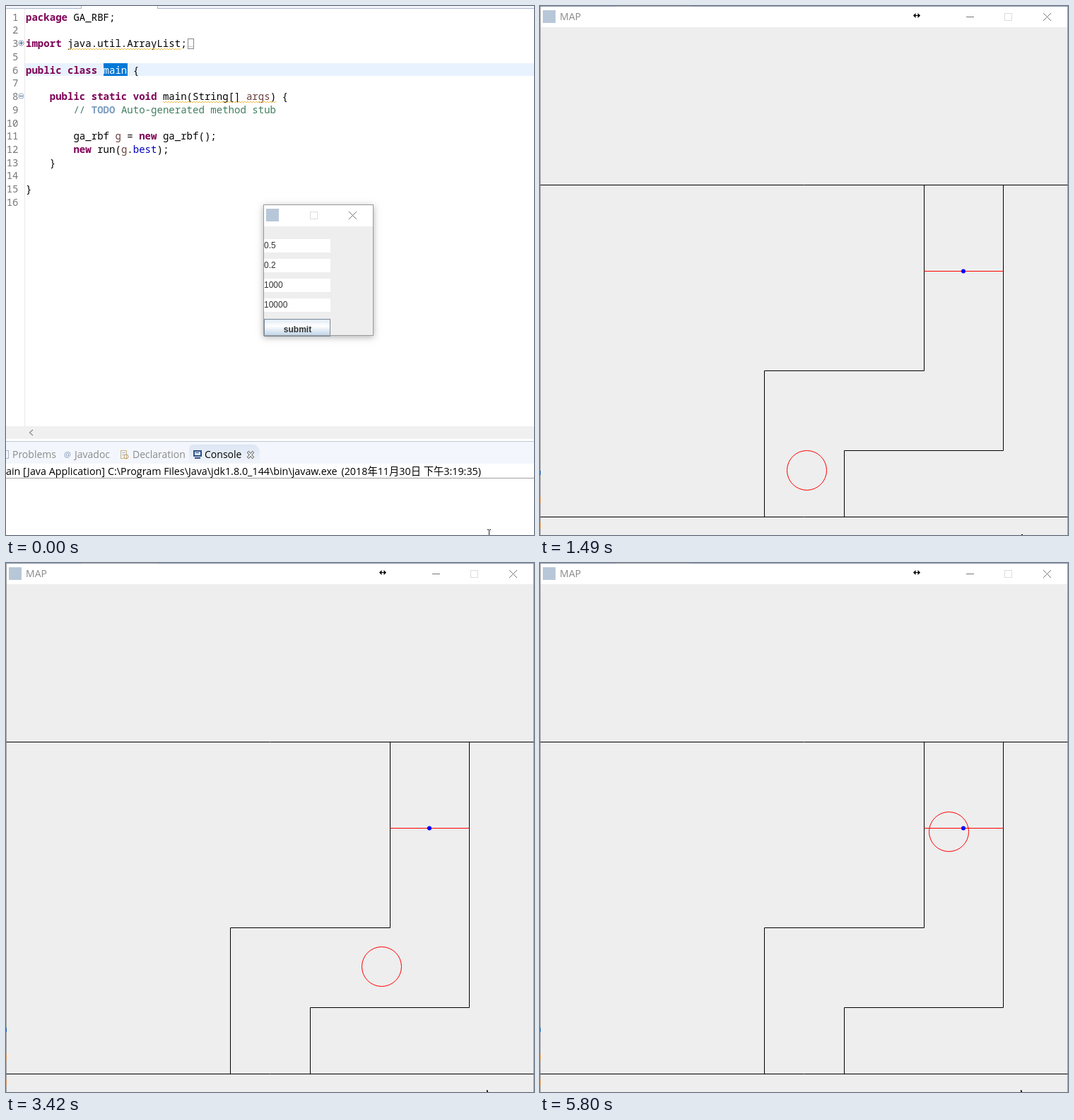
These frames come from a looping animation (747x749 px, 6.97 s). An HTML page with a canvas:

```html
<!DOCTYPE html>
<html lang="en">
<head>
<meta charset="utf-8">
<title>Map run</title>
<style>
  html, body { margin: 0; width: 100%; height: 100%; overflow: hidden; background: #fff; }
  canvas { position: absolute; left: 0; top: 0; display: block; }
</style>
</head>
<body>
<canvas id="desk" width="747" height="749"></canvas>
<canvas id="map" width="747" height="749"></canvas>
<script>
const W = 747, H = 749, LOOP = 6970;
const mapEl = document.getElementById('map');
const desk = document.getElementById('desk').getContext('2d');
const map = mapEl.getContext('2d');

const MONO = '14.05px "Noto Sans Mono", "Noto Sans CJK TC", "Noto Sans CJK", monospace';
const UI = '"Open Sans", "Noto Sans CJK TC", "Noto Sans CJK", sans-serif';
const ARIAL = '"Liberation Sans", Arial, sans-serif';
const CHAR = 8.43;
const ICON = '#b8c7d8';

// Bursts of screen updates: first time, last time, count
const BURSTS = [
  [800, 1320, 8], [1490, 1650, 3], [1790, 1950, 3], [2100, 2330, 4], [2500, 2650, 3],
  [2800, 3030, 4], [3190, 3420, 4], [3570, 3730, 3], [3880, 4110, 4], [4260, 4420, 3],
  [4570, 4730, 3], [4880, 5110, 4], [5260, 5420, 3], [5570, 5800, 4]
];
const TICKS = BURSTS.flatMap(([a, b, n]) =>
  Array.from({ length: n }, (_, i) => Math.floor((a + (b - a) * i / (n - 1)) / 10) * 10));

// Car path: move count, x, y
const PATH = [
  [0, 374.5, 722.5], [2, 374.5, 704.5], [6, 376.5, 667.5], [7, 377.5, 657.5], [9, 384.5, 641.5],
  [12, 401.5, 621.5], [16, 434.5, 602.5], [19, 459.5, 591.5], [21, 478.5, 587.5],
  [23, 496.5, 583.5], [27, 531.5, 571.5], [30, 555.5, 556.5], [33, 574.5, 537.5],
  [34, 580.5, 529.5], [37, 592.5, 504.5], [40, 599.5, 477.5], [42, 602.5, 459.5],
  [44, 601.5, 440.5], [47, 595.5, 413.5], [51, 578.5, 380.5]
];

function slope(i, c) {
  const a = PATH[Math.max(0, i - 1)], b = PATH[Math.min(PATH.length - 1, i + 1)];
  return (b[c] - a[c]) / (b[0] - a[0]);
}

// Smooth curve through the path, snapped to whole pixels
function carAt(k) {
  let i = 0;
  while (i < PATH.length - 2 && PATH[i + 1][0] <= k) i++;
  const p = PATH[i], q = PATH[i + 1], d = q[0] - p[0], u = (k - p[0]) / d, v = 1 - u;
  return [1, 2].map(c => {
    const at = v * v * (1 + 2 * u) * p[c] + u * u * (3 - 2 * u) * q[c]
      + d * u * v * (v * slope(i, c) - u * slope(i + 1, c));
    return Math.floor(at) + 0.5;
  });
}

function rect(g, x, y, w, h, color) {
  g.fillStyle = color;
  g.fillRect(x, y, w, h);
}

function frame(g, x, y, w, h, color) {
  g.strokeStyle = color;
  g.lineWidth = 1;
  g.strokeRect(x + 0.5, y + 0.5, w - 1, h - 1);
}

function poly(g, pts, color, width = 1) {
  g.strokeStyle = color;
  g.lineWidth = width;
  g.beginPath();
  pts.forEach(([x, y]) => g.lineTo(x, y));
  g.stroke();
}

function ring(g, x, y, r, color) {
  g.strokeStyle = color;
  g.lineWidth = 1;
  g.beginPath();
  g.arc(x, y, r, 0, Math.PI * 2);
  g.stroke();
}

function text(g, s, x, y, font, color, align = 'left') {
  g.font = font;
  g.fillStyle = color;
  g.textAlign = align;
  g.fillText(s, x, y);
}

function cross(g, x, y, r, color) {
  poly(g, [[x - r, y - r], [x + r, y + r]], color);
  poly(g, [[x - r, y + r], [x + r, y - r]], color);
}

function wave(x0, x1, y) {
  const pts = [];
  for (let x = x0, i = 0; x <= x1; x += 2, i++) pts.push([x, y + (i % 2 ? 1 : -1)]);
  poly(desk, pts, '#eebd4a');
}

const rowY = i => Math.round(20.7 + 18.73 * i);
const colX = c => 28 + CHAR * c;

// Styles: k keyword, p plain, v variable, f field, c comment, t task tag
const INK = { k: '#7f0055', p: '#000', v: '#6a3e3e', f: '#0000c0', c: '#3f7f5f', t: '#7f9fbf' };
const CODE = [
  [0, 0, 'k', 'package', 'p', ' GA_RBF;'],
  [2, 0, 'k', 'import', 'p', ' java.util.ArrayList;'],
  [4, 0, 'k', 'public class', 'p', '      {'],
  [6, 4, 'k', 'public static void', 'p', ' main(String[] ', 'v', 'args', 'p', ') {'],
  [7, 8, 'c', '// ', 't', 'TODO', 'c', ' Auto-generated method stub'],
  [9, 8, 'p', 'ga_rbf ', 'v', 'g', 'p', ' = ', 'k', 'new', 'p', ' ga_rbf();'],
  [10, 8, 'k', 'new', 'p', ' run(', 'v', 'g', 'p', '.', 'f', 'best', 'p', ');'],
  [11, 4, 'p', '}'],
  [13, 0, 'p', '}']
];

function drawEditor() {
  const g = desk;
  rect(g, 0, 0, W, 3, '#f3f5fa');
  rect(g, 107, 0, 107, 4, '#fff');
  rect(g, 0, 3, 106, 1, '#a9b8cf');
  rect(g, 214, 3, W - 214, 1, '#a9b8cf');
  rect(g, 106, 0, 1, 4, '#a9b8cf');
  rect(g, 214, 0, 1, 4, '#a9b8cf');
  rect(g, 26, 4, 1, 591, '#e8e8e8');

  rect(g, 27, 81, W - 27, 18, '#e8f2fe');
  for (let i = 0; i < 15; i++) {
    text(g, i < 3 ? i + 1 : i + 2, 17.5, rowY(i), MONO, '#787878', 'right');
  }
  for (const [row, indent, ...runs] of CODE) {
    let c = indent;
    for (let i = 0; i < runs.length; i += 2) {
      const style = runs[i], s = runs[i + 1];
      text(g, s, colX(c), rowY(row), (/[kt]/.test(style) ? 'bold ' : '') + MONO, INK[style]);
      c += s.length;
    }
  }
  rect(g, 138, 81, 34, 18, '#0078d7');
  text(g, 'main', colX(13), rowY(4), MONO, '#fff');
  wave(88, 249, 61);
  wave(222, 383, 136);

  frame(g, 257, 46, 9, 15, '#888');
  for (let i = 0; i < 3; i++) rect(g, 259 + 2 * i, 57, 1, 1, '#888');
  for (const [y, plus] of [[53, true], [128, false]]) {
    ring(g, 21.5, y - 0.5, 3.6, '#8fa3bd');
    rect(g, 19, y - 1, 5, 1, '#34608f');
    if (plus) rect(g, 21, y - 3, 1, 5, '#34608f');
  }

  rect(g, 0, 595, W, 18, '#f0f0f0');
  poly(g, [[38, 600], [33.5, 604], [38, 608]], '#8a8a8a', 1.2);
}

function drawPanel() {
  const g = desk;
  rect(g, 0, 616, W, 1, '#c0c8d4');
  rect(g, 0, 617, W, 31, '#f3f6fc');
  const fill = g.createLinearGradient(0, 620, 0, 648);
  fill.addColorStop(0, '#dbe5f3');
  fill.addColorStop(1, '#f1f5fb');
  g.fillStyle = fill;
  g.beginPath();
  g.moveTo(259, 648);
  g.lineTo(259, 627);
  g.quadraticCurveTo(259, 621, 266, 621);
  g.lineTo(350, 621);
  g.quadraticCurveTo(358, 622, 359, 632);
  g.lineTo(359, 648);
  g.fill();

  const font = '14px ' + UI, dim = '#8b8b8b';
  text(g, 'Problems', 9, 640, font, dim);
  text(g, '@', 82, 639, '11px ' + UI, '#7d93b5');
  text(g, 'Javadoc', 97, 640, font, dim);
  text(g, 'Declaration', 179, 640, font, dim);
  text(g, 'Console', 281, 640, font, '#000');
  frame(g, -6, 629, 10, 12, '#a9b3c2');
  frame(g, 162, 629, 9, 12, '#c3b28b');
  rect(g, 164, 632, 5, 1, '#a5b4cc');
  rect(g, 164, 635, 4, 1, '#a5b4cc');
  ring(g, 170, 638, 3, '#c59c55');
  rect(g, 265, 629, 12, 9, '#2f4f86');
  rect(g, 267, 631, 8, 5, '#dce9fa');
  rect(g, 268, 632, 5, 1, '#2f4f86');
  rect(g, 267, 639, 8, 2, '#2f4f86');
  poly(g, [[342, 631], [350, 640]], '#666', 3.4);
  poly(g, [[350, 631], [342, 640]], '#666', 3.4);
  poly(g, [[342.5, 631.5], [349.5, 639.5]], '#fff', 1.6);
  poly(g, [[349.5, 631.5], [342.5, 639.5]], '#fff', 1.6);

  const line = '14.3px ' + UI;
  text(g, 'main [Java Application]', 140, 664, line, '#000', 'right');
  text(g, 'C:\\Program Files\\Java\\jdk1.8.0_144\\bin\\javaw.exe', 144, 664, line, '#000');
  text(g, '(2018年11月30日 下午3:19:35)', 672, 664, line, '#000', 'right');
  rect(g, 0, 668, W, 1, '#a0a0a0');
}

function drawLog() {
  const put = (s, x, y) => text(desk, s, x, y, MONO, '#000');
  put('err: 0.05737647252079299 [0.8352573824121775, 0.6596016012123814, 0.6211971346937675, 22.3', -9, 685);
  put('0.545108995426877', -9, 704);
  put('前:22.0 右:8.48528137423857 左:8.485281374238571 deg:3.6087196341501553', -5, 722);
}

function drawDialog() {
  const g = desk;
  g.save();
  g.shadowColor = 'rgba(0,0,0,.3)';
  g.shadowBlur = 9;
  g.shadowOffsetY = 2;
  rect(g, 364, 281, 156, 186, '#eee');
  g.restore();
  rect(g, 365, 282, 154, 30, '#fff');
  rect(g, 368, 287, 18, 18, ICON);
  frame(g, 430, 291, 11, 11, '#ddd');
  cross(g, 490.5, 296.5, 5.5, '#777');
  ['0.5', '0.2', '1000', '10000'].forEach((s, i) => {
    rect(g, 365, 330 + 28 * i, 94, 19, '#fff');
    text(g, s, 365, 343 + 28 * i, '12px ' + ARIAL, '#333');
  });
  const fill = g.createLinearGradient(0, 443, 0, 468);
  fill.addColorStop(0, '#dde8f3');
  fill.addColorStop(0.4, '#fff');
  fill.addColorStop(1, '#b8cfe5');
  g.fillStyle = fill;
  g.fillRect(365, 443, 94, 24);
  frame(g, 365, 443, 94, 25, '#7a8a99');
  text(g, 'submit', 412.5, 462, 'bold 12px ' + ARIAL, '#333', 'center');
  frame(g, 364, 281, 156, 186, '#9a9a9a');
}

function drawDesk(started) {
  rect(desk, 0, 0, W, H, '#fff');
  drawEditor();
  drawPanel();
  drawDialog();
  if (started) return drawLog();
  rect(desk, 683, 742, 1, 7, '#222');
  rect(desk, 681, 741, 2, 1, '#222');
  rect(desk, 684, 741, 2, 1, '#222');
}

function drawMap(n) {
  const g = map, opening = n < 5, early = n < 3;
  const size = opening ? 1 - 0.043 * 0.387 ** n : 1;
  const ink = early ? '#222' : '#000', red = early ? '#b81c1c' : '#f00';
  const line = (color, ...pts) => poly(g, pts.map(([x, y]) => [x + 0.5, y + 0.5]), color);

  mapEl.style.opacity = opening ? 1 - 0.75 * 0.416 ** n : 1;
  g.clearRect(0, 0, W, H);
  g.save();
  g.translate(W / 2, H / 2);
  g.scale(size, size);
  g.translate(-W / 2, -H / 2);

  rect(g, 0, 0, W, H, '#eee');
  rect(g, 0, 0, W, 30, '#fff');
  rect(g, 0, 0, 1, H, '#a0a0a0');
  rect(g, W - 1, 0, 1, H, '#a0a0a0');
  rect(g, 0, 0, W, 1, '#8c9bb0');
  if (opening) rect(g, 0, H - 1, W, 1, '#a0a0a0');
  else {
    rect(g, 107, 0, 107, 1, '#a2a5aa');
    rect(g, 0, 658, 1, 6, '#1b5fae');
    rect(g, 0, 695, 1, 9, '#d9985f');
    rect(g, 0, 731, 1, 9, '#d9985f');
  }

  // The title is dark until the window loses focus
  rect(g, 4, 6, 18, 18, ICON);
  text(g, 'MAP', 28, 20, '14px ' + UI, early ? '#444' : '#8a8a8a');
  const button = early ? '#444' : '#777';
  rect(g, 603, 15, 11, 1, button);
  frame(g, 657, 10, 11, 11, '#ddd');
  cross(g, 717.5, 15.5, 5.5, button);

  line(ink, [0, 253], [746, 253]);
  line(ink, [0, 723], [746, 723]);
  line(ink, [543, 253], [543, 516], [317, 516], [317, 723]);
  line(ink, [655, 253], [655, 629], [430, 629], [430, 723]);
  line(red, [543, 375], [655, 375]);

  // The car misses one update while the window opens
  const [cx, cy] = carAt(early ? n : n - 1);
  ring(g, cx, cy, 28, red);
  g.fillStyle = early ? '#123' : '#00f';
  g.beginPath();
  g.arc(599, 375.5, 3, 0, Math.PI * 2);
  g.fill();
  g.restore();

  // Resize pointer left on the title bar
  g.globalAlpha = early ? 0.3 : 1;
  rect(g, 530, 13, 6, 1, '#000');
  for (const [x, d] of [[528, 1], [538, -1]]) {
    g.beginPath();
    g.moveTo(x, 13.5);
    g.lineTo(x + 3.5 * d, 10);
    g.lineTo(x + 3.5 * d, 17);
    g.fill();
  }
  g.globalAlpha = 1;
  if (n < 11) rect(g, 681, 748, 2, 1, '#000');
  else {
    rect(g, 680, 746, 1, 3, '#000');
    rect(g, 681, 747, 1, 2, '#000');
  }
}

let shown = null;
const start = performance.now();

function run() {
  const t = (performance.now() - start) % LOOP;
  const n = TICKS.filter(at => at <= t).length - 1;
  if (n !== shown) {
    shown = n;
    drawDesk(n >= 0);
    mapEl.style.display = n < 0 ? 'none' : 'block';
    if (n >= 0) drawMap(n);
  }
  requestAnimationFrame(run);
}
run();
</script>
</body>
</html>
```
